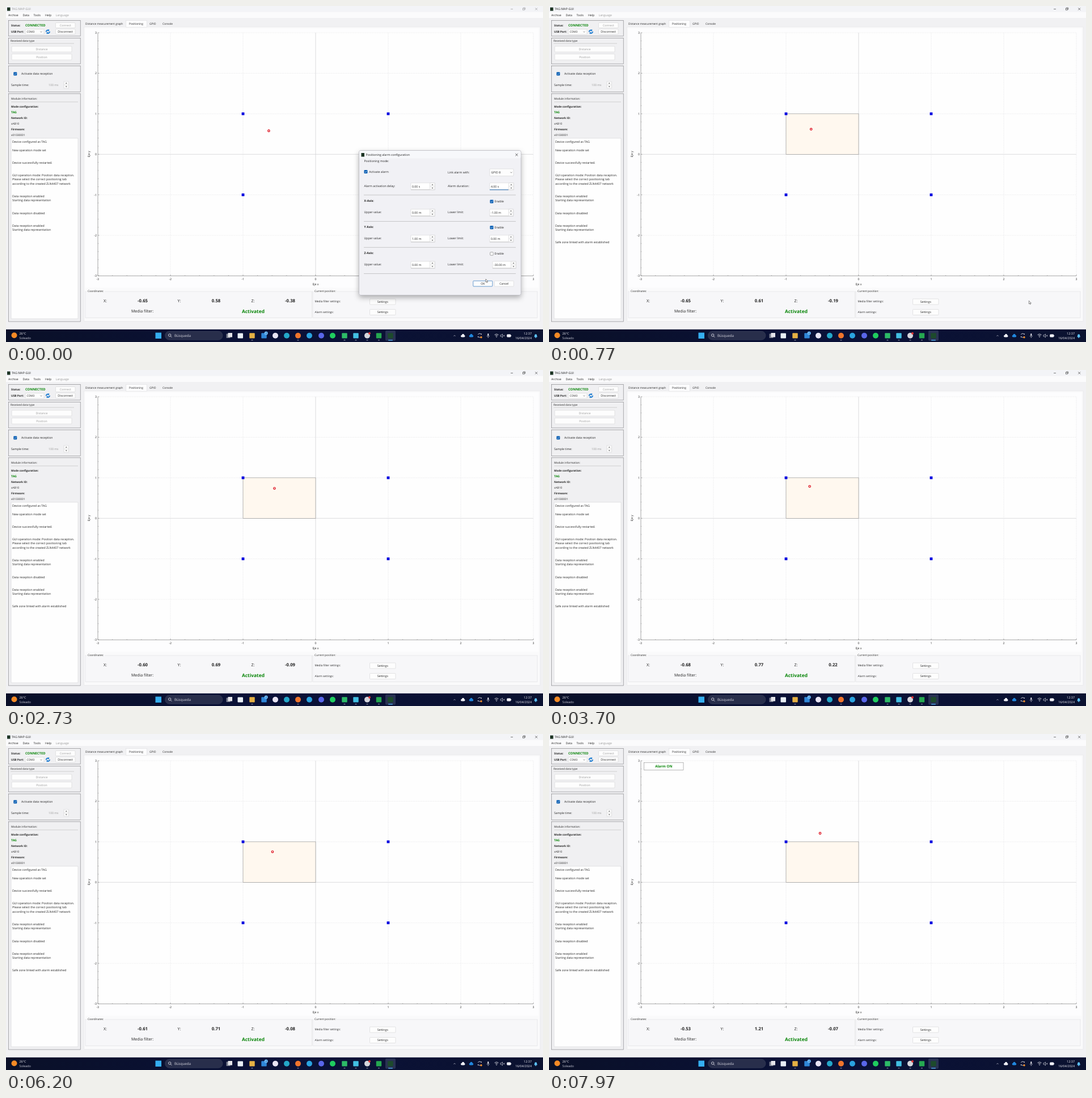
These frames come from a looping animation (947 by 592 pixels, 8000 ms). An HTML page:

```html
<!DOCTYPE html>
<html lang="en">
<head>
<meta charset="utf-8">
<title>Positioning monitor</title>
<style>
  html, body { margin: 0; width: 100%; height: 100%; overflow: hidden; background: #f1f1f3; }
  svg { display: block; width: 100vw; height: 100vh; }
  text { font-family: "Open Sans", "Noto Sans", sans-serif; text-rendering: geometricPrecision; white-space: pre; }
</style>
</head>
<body>
<svg id="stage" viewBox="0 0 947 592"></svg>
<script>
const INK = '#222', DIM = '#999', GREEN = '#0a860a', BLUE = '#0a5fb4', EDGE = '#d4d4d6';
const SMALL = 4.8, NORMAL = 5.2;

// Drawing helpers: each returns SVG markup; text y is the vertical centre of the capitals.
const text = (x, y, str, { size = NORMAL, fill = INK, bold = false, anchor = 'start', id = '' } = {}) =>
  `<text ${id && `id="${id}"`} x="${x}" y="${y + size * 0.36}" font-size="${size}" fill="${fill}"
    font-weight="${bold ? 700 : 400}" text-anchor="${anchor}">${str}</text>`;
const mid = (x, y, str, options) => text(x, y, str, { anchor: 'middle', ...options });
const rect = (x, y, w, h, fill, stroke = 'none', r = 0, extra = '') =>
  `<rect x="${x}" y="${y}" width="${w}" height="${h}" fill="${fill}" stroke="${stroke}" stroke-width=".6" rx="${r}" ${extra}/>`;
const line = (x1, y1, x2, y2, stroke, width = .6, extra = '') =>
  `<line x1="${x1}" y1="${y1}" x2="${x2}" y2="${y2}" stroke="${stroke}" stroke-width="${width}" ${extra}/>`;
const path = (d, stroke = INK, width = .7, fill = 'none') =>
  `<path d="${d}" fill="${fill}" stroke="${stroke}" stroke-width="${width}"/>`;
const dot = (x, y, r, fill, extra = '') => `<circle cx="${x}" cy="${y}" r="${r}" fill="${fill}" ${extra}/>`;
const chevron = (x, y, stroke = '#555', dir = 1) => path(`M${x - 1.5} ${y - .8 * dir}l1.5 ${1.6 * dir}l1.5 ${-1.6 * dir}`, stroke, .6);

const button = (x, y, w, h, label, fill = INK) =>
  rect(x, y, w, h, '#fdfdfd', EDGE, 1) + mid(x + w / 2, y + h / 2, label, { fill });
const checkbox = (x, y, on) => on
  ? rect(x - 3, y - 3, 6, 6, BLUE, 'none', 1) + path(`M${x - 1.6} ${y}l1.2 1.2l2.1 -2.3`, '#fff')
  : rect(x - 2.8, y - 2.8, 5.6, 5.6, '#f8f8f8', '#777', 1);
const arrows = (x, y) =>
  rect(x, y - 6, 8.5, 12, '#fafafa', EDGE) + line(x, y, x + 8.5, y, EDGE) +
  [-1, 1].map(d => `<path d="M${x + 2.9} ${y + d * 2.3}h2.8l-1.4 ${d * 1.7}z" fill="#555"/>`).join('');
const spin = (x, y, value, width = 42.5) =>
  rect(x, y - 6, width, 12, '#fff', EDGE, 1) + line(x, y + 6, x + width, y + 6, '#aaa') +
  text(x + 2, y, value) + arrows(x + width - 8.8, y);

// World to screen
const px = x => 546 + 128 * x;
const py = y => 261.3 - 71.4 * y;

function titleAndMenu() {
  return rect(0, 0, 947, 10.5, '#f3f4f7') + rect(0, 10.5, 947, 10.5, '#fbfbfc') +
    rect(2, 2.5, 5.5, 6, '#1d3524') +
    text(10, 5.4, 'TAG MAP-GUI', { size: 5.4, id: 'title' }) +
    `<g id="caption">${line(890, 5.4, 894, 5.4, INK)}${rect(911.5, 4, 3, 3, 'none', INK)}
      ${path('M912.7 4v-1h3v3h-1', INK, .5)}${path('M933.2 3.3l4 4m0 -4l-4 4', INK, .6)}</g>` +
    [[4, 'Archive'], [29.5, 'Data'], [48.5, 'Tools'], [69, 'Help']].map(([x, s]) => text(x, 15.7, s)).join('') +
    text(87.5, 15.7, 'Language', { fill: DIM });
}

function sidebar() {
  const box = (top, bottom) => rect(4.5, top, 126.7, bottom - top, '#f0f0f2', '#77777c');
  const heading = (y, str, size = SMALL) => text(9, y, str, { size, bold: true });
  const log = ['Device configured as TAG', '', 'New operation mode set', '', '', 'Device successfully restarted.', '', '',
    'GUI operation mode: Position data reception.', 'Please select the correct positioning tab',
    'according to the created ZLN4407 network', '', '', 'Data reception enabled', 'Starting data representation',
    '', '', 'Data reception disabled', '', '', 'Data reception enabled', 'Starting data representation'];
  const logLine = (str, i, id) => text(11, 239 + 7.4 * i, str, { id });
  return box(25.5, 53) + heading(34, 'Status:') +
    text(34, 34, 'CONNECTED', { size: 5.8, bold: true, fill: GREEN }) + button(87.5, 29.5, 34.5, 9, 'Connect', DIM) +
    heading(45.3, 'USB Port:') + rect(34, 41, 33, 9, '#fdfdfd', EDGE, 1) + text(36.5, 45.3, 'COM3', { size: SMALL }) +
    chevron(62, 45.5) + button(87.5, 40.7, 34.5, 9, 'Disconnect') +
    path('M70.8 45.8a3 3 0 0 1 5 -2.6M77 44.8a3 3 0 0 1 -5 2.6', '#1779d0', 1.7) +
    path('M75.6 41.3v2.6h-2.6M72.2 49.2v-2.6h2.6', '#1779d0', .9) +

    box(56.5, 102) + text(8, 61, 'Received data type', { size: SMALL }) + line(8, 66, 120, 66, '#bbb') +
    button(10, 71, 106, 10, 'Distance', DIM) + button(10, 84.5, 106, 10.5, 'Position', DIM) +

    box(105.5, 151.5) + checkbox(16.3, 119.5, true) + text(27, 119.5, 'Activate data reception') +
    text(9, 139, 'Sample time:') + text(75, 139, '100 ms', { fill: DIM }) + arrows(102, 139) +

    box(154.5, 556) + text(9, 163, 'Module information:', { size: SMALL }) + line(9, 169, 127, 169, '#bbb') +
    heading(177, 'Mode configuration:') + text(9, 187.5, 'TAG', { bold: true, fill: GREEN }) +
    heading(197.5, 'Network ID:') + text(9, 207.5, 'xAB10', { size: SMALL }) +
    heading(217.2, 'Firmware:') + text(9, 226.8, 'x01030001', { size: SMALL }) +
    rect(9, 233, 118, 318, '#fefefe', EDGE) + log.map((s, i) => logLine(s, i, '')).join('') +
    logLine('Safe zone linked with alarm established', 24, 'linked');
}

function plot() {
  let out = rect(137.5, 37, 804.5, 518.5, '#fafafb', '#e4e4e6') + rect(211.5, 25.5, 37, 12, '#fcfcfd', '#e0e0e2') +
    [[140, 'Distance measurement graph'], [217, 'Positioning'], [253, 'GPIO'], [276, 'Console']]
      .map(([x, s]) => text(x, 31, s, { size: SMALL })).join('') +
    rect(140, 40, 799, 456, '#fdfdfe') + rect(162, 47, 768, 428.5, '#fefefe');
  for (let v = -3; v <= 3; v++) {
    const grid = v ? ['#dedee0', .5, 'stroke-dasharray="2 1"'] : ['#cdcdd0', .7];
    out += line(px(v), 47, px(v), 475.5, ...grid) + line(162, py(v), 930, py(v), ...grid) +
      mid(v < 0 ? px(v) - .3 : px(v), 481.3, v) + text(160, py(v), v, { anchor: 'end' });
  }
  for (let i = -15; i <= 15; i++) {
    const length = i % 5 ? 1.2 : 2.5;
    out += line(px(i / 5), 475.5, px(i / 5), 475.5 - length, '#666', .5) +
      line(162, py(i / 5), 162 + length, py(i / 5), '#666', .5);
  }
  const anchors = [[-1, 1], [1, 1], [-1, -1], [1, -1]];
  return out + line(162, 47, 162, 475.5, '#777') + line(162, 475.5, 930, 475.5, '#777') +
    mid(546, 490, 'Eje x') + `<g transform="rotate(-90 146 261)">${mid(146, 261, 'Eje y')}</g>` +
    rect(px(-1), py(1), 128, 71.4, '#fff8ef', '#858585', 0, 'id="zone"') +
    anchors.map(([x, y]) => rect(px(x) - 2.4, py(y) - 2.4, 4.8, 4.8, '#0000e0')).join('') +
    dot(0, 0, 1.7, '#fff', 'id="tag" stroke="#dc0010" stroke-width="1.2"') +
    `<g id="alarm">${rect(167.5, 50.2, 69.5, 13.3, '#fff', '#888')}
      ${mid(202.3, 56.8, 'Alarm ON', { size: 6.2, bold: true, fill: GREEN })}</g>`;
}

function readouts() {
  const value = (x, id) => mid(x, 519, '', { size: 7.7, bold: true, id });
  return rect(140, 503, 399.5, 46.5, '#f7f7f9', '#dedee0') + rect(541, 503, 396, 46.5, '#f7f7f9', '#dedee0') +
    rect(143, 500, 31, 5, '#f9f9fa') + rect(543, 500, 40, 5, '#f9f9fa') +
    text(144, 502.7, 'Coordinates:', { size: SMALL }) + text(544, 502.7, 'Current position:', { size: SMALL }) +
    [[172, 'X:'], [302.5, 'Y:'], [432.5, 'Z:']].map(([x, s]) => text(x, 519, s, { size: 7 })).join('') +
    value(241, 'valueX') + value(370.5, 'valueY') + value(501, 'valueZ') +
    text(221, 537.8, 'Media filter:', { size: 7 }) +
    mid(436, 537.5, 'Activated', { size: 8.4, bold: true, fill: GREEN }) +
    text(544.5, 520.3, 'Media filter settings:', { size: SMALL }) + button(641.5, 516, 45.5, 10, 'Settings') +
    text(544.5, 539, 'Alarm settings:', { size: SMALL }) + button(641.5, 534.5, 45.5, 10, 'Settings');
}

function dialog() {
  const axis = (y, name, upper, lower, on, shift = 0) =>
    text(631.5, y, name, { bold: true }) + checkbox(856.5, y + 1, on) + text(861.5, y + 1, 'Enable') +
    text(631.5, y + 20, 'Upper value:') + spin(714, y + 20.5, upper) +
    text(779, y + 20, 'Lower limit:') + spin(853 + shift, y + 20.5, lower, 42 - shift / 10) +
    line(631, y + 36, 899, y + 36, '#aaa');
  return `<g id="dialog">` +
    rect(622.5, 254.5, 285.7, 255, '#f1f1f5', '#a5a5ad', 3, 'filter="url(#shadow)"') +
    rect(623, 255, 284.7, 13.5, '#f7f8fb', 'none', 3) +
    rect(626.5, 259, 5.5, 6.5, '#1d3524') + text(634.5, 262.2, 'Positioning alarm configuration', { size: 5.3 }) +
    path('M898.4 260l4.2 4.2m0 -4.2l-4.2 4.2', INK) +
    text(631.5, 273, 'Positioning mode:') + checkbox(634.5, 292, true) + text(640.3, 292, 'Activate alarm') +
    text(779, 292.7, 'Link alarm with:') + rect(853, 287, 42, 12.5, '#fdfdfd', EDGE, 1) +
    text(855.5, 293.3, 'GPIO 8') + chevron(891, 293.3) +
    text(631.5, 317, 'Alarm activation delay:') + spin(714, 317.7, '0.00 s') +
    text(779, 317, 'Alarm duration:') + spin(853, 317.7, '4.00 s') + line(853, 323.8, 886, 323.8, BLUE, .8) +
    line(631, 333, 899, 333, '#aaa') +
    axis(343.5, 'X-Axis:', '0.00 m', '-1.00 m', true) +
    axis(389.3, 'Y Axis:', '1.00 m', '0.00 m', true) +
    axis(435.5, 'Z-Axis:', '0.00 m', '-30.00 m', false, 5) +
    rect(823.8, 484.3, 34, 9.7, '#fdfdfd', BLUE, 1, 'id="ok"') + mid(840.8, 489.3, 'OK') +
    button(861.3, 484.3, 34, 9.7, 'Cancel') + `</g>`;
}

function taskbar() {
  const apps = [['#e5b044', 434, 1], ['#2f86d8', 455], ['#e8e4f3', 475, 0, 1], ['#24a7c9', 495, 0, 1], ['#f0742c', 515, 1, 1],
    ['#2aa3df', 535, 0, 1], ['#5966ea', 556, 0, 1], ['#1fcd5f', 576, 0, 1], ['#2dbb67', 597, 1], ['#42bfe3', 617, 1],
    ['#d5d5dc', 637, 1, 1], ['#25a850', 657.5, 1], ['#1d4a2c', 678]];
  const white = '#f0f0f6', label = { size: 5.45, fill: white };
  return rect(0, 569.8, 947, 22.2, 'url(#bar)') +
    dot(14.5, 580.3, 5, '#f58a25') + text(23.5, 577, '26°C', label) + text(23.5, 584.8, 'Soleado', { ...label, fill: '#c9cad6' }) +
    rect(263.5, 575.5, 10.5, 10.5, '#35aef0') + rect(280.5, 573, 101.5, 15.3, '#282e4b', '#3a405b', 7.6) +
    dot(288.7, 580, 2.2, 'none', `stroke="${white}" stroke-width=".8"`) + line(290.3, 581.7, 292.3, 583.8, white, .8) +
    text(297, 581, 'Búsqueda', { size: 6.2, fill: '#d5d6df' }) +
    rect(388.5, 577.5, 7, 7.5, '#777b8c') + rect(391.5, 576, 7.5, 7.5, '#e5e5ea') +
    rect(408.5, 576.5, 9.5, 9, '#e9eff5', 'none', 1) +
    rect(669, 571.8, 18, 18, '#293253', 'none', 2) +
    apps.map(([fill, x, running, round]) =>
      (round ? dot(x, 580.8, 5, fill) : rect(x - 4.7, 576.2, 9.4, 9.4, fill, 'none', 1)) +
      (running ? rect(x - 1.5, 588.3, 3, 1, '#a5a8b8', 'none', .5) : '')).join('') +
    dot(458.7, 576.5, 3, '#70bfff') + mid(458.7, 576.5, '2', { size: 4.3, fill: '#102040' }) +
    dot(641, 576.7, 2, '#e23434') + rect(674, 588.2, 8, 1.2, '#55baff', 'none', .6) +
    chevron(791, 581, white, -1) +
    rect(802, 579.7, 7.5, 3.8, white, 'none', 1.9) + dot(806, 580, 2.2, white) +
    rect(816.7, 579.7, 7.5, 3.8, '#2188df', 'none', 1.9) + dot(820.5, 580, 2.2, '#2188df') +
    path('M832.3 579a3.3 3.3 0 0 1 6 0v-2M838.4 582a3.3 3.3 0 0 1 -6 0v2', white, .8) + dot(838, 583.8, 1.7, '#f08b26') +
    rect(849.3, 577, 2, 4.6, white, 'none', 1) + path('M848 580.7a2.3 2.3 0 0 0 4.6 0M850.3 583v2', white, .5) +
    path('M861.5 579.4q3.5 -3 7 0M863 581.2q2 -1.8 4 0', white, .8) + dot(865, 583, .8, white) +
    path('M872 579.7h1.5l2 -1.7v6l-2 -1.7h-1.5zM877 579.7l2.4 2.5m0 -2.5l-2.4 2.5', white, .6) +
    rect(883.5, 578.7, 6.5, 4.5, white, white, 1) + rect(890.3, 580, .8, 2, white) +
    text(927, 577, '12:37', { ...label, anchor: 'end' }) + text(927, 584.8, '16/04/2024', { ...label, anchor: 'end' }) +
    path('M931.2 583.2q1 -1 1 -3a2 2 0 0 1 4 0q0 2 1 3z', 'none', 0, '#5fc4ff') + dot(934.2, 584, 1, '#5fc4ff');
}

const stage = document.getElementById('stage');
stage.innerHTML = `<defs>
  <linearGradient id="bar"><stop stop-color="#0a1028"/><stop offset=".5" stop-color="#0a1138"/><stop offset="1" stop-color="#0b1230"/></linearGradient>
  <filter id="shadow" x="-10%" y="-10%" width="120%" height="125%"><feDropShadow dx="0" dy="4" stdDeviation="5" flood-opacity=".3"/></filter>
  </defs>` + rect(0, 0, 947, 592, '#f1f1f3') + titleAndMenu() + sidebar() + plot() + readouts() + dialog() + taskbar() +
  `<path id="cursor" d="M0 0v5.6l1.3 -1.2l.9 2l.9 -.4l-.9 -1.9h1.8z" fill="#fff" stroke="#222" stroke-width=".5"/>`;
const el = Object.fromEntries([...stage.querySelectorAll('[id]')].map(node => [node.id, node]));

// time, displayed x, y, z, plotted x, y
const samples = [
  [0, -.65, .58, -.38, -.645, .58],
  [400, -.65, .54, -.34, -.648, .543],
  [1500, -.66, .81, .21, -.672, .825],
  [2700, -.60, .69, -.09, -.567, .74],
  [4700, -.76, .85, .53, -.782, .838],
  [6200, -.61, .71, -.08, -.594, .754],
  [7900, -.53, 1.21, -.07, -.531, 1.21],
];
const LOOP = 8000, SAMPLE_TIME = 100, CLOSE_START = 330, CLOSE_LENGTH = 165, ZONE_SET = 530;
const clamp = v => Math.min(1, Math.max(0, v));
const mix = (a, b, p) => a + (b - a) * p;
const show = (node, on) => node.setAttribute('visibility', on ? 'visible' : 'hidden');

function sampleAt(t) {
  const time = Math.floor(t / SAMPLE_TIME) * SAMPLE_TIME;
  const next = Math.max(1, samples.findIndex(s => s[0] >= time));
  const [a, b] = [samples[next - 1], samples[next]];
  return a.map((v, i) => mix(v, b[i], (time - a[0]) / (b[0] - a[0]))).slice(1);
}

function draw(t) {
  const [x, y, z, tagX, tagY] = sampleAt(t);
  el.valueX.textContent = x.toFixed(2);
  el.valueY.textContent = y.toFixed(2);
  el.valueZ.textContent = z.toFixed(2);
  el.tag.setAttribute('cx', px(tagX));
  el.tag.setAttribute('cy', py(tagY));
  show(el.alarm, tagY > 1);
  show(el.zone, t >= ZONE_SET);
  show(el.linked, t >= ZONE_SET);

  const closing = clamp((t - CLOSE_START) / CLOSE_LENGTH);
  el.dialog.setAttribute('opacity', 1 - closing);
  el.dialog.setAttribute('transform', `translate(765 382) scale(${1 - .06 * closing}) translate(-765 -382)`);
  el.ok.setAttribute('fill', closing ? '#c9e1f6' : '#fdfdfd');
  el.title.setAttribute('fill', closing ? INK : DIM);
  el.caption.setAttribute('opacity', closing ? 1 : .5);

  const toButton = clamp(t / 300), leave = clamp((t - 500) / 500);
  el.cursor.setAttribute('transform',
    `translate(${mix(846, 842, toButton) + 8 * leave} ${mix(481, 487, toButton) + 110 * leave * leave})`);
}

function tick(now) {
  draw(now % LOOP);
  requestAnimationFrame(tick);
}
draw(0);
requestAnimationFrame(tick);
</script>
</body>
</html>
```
